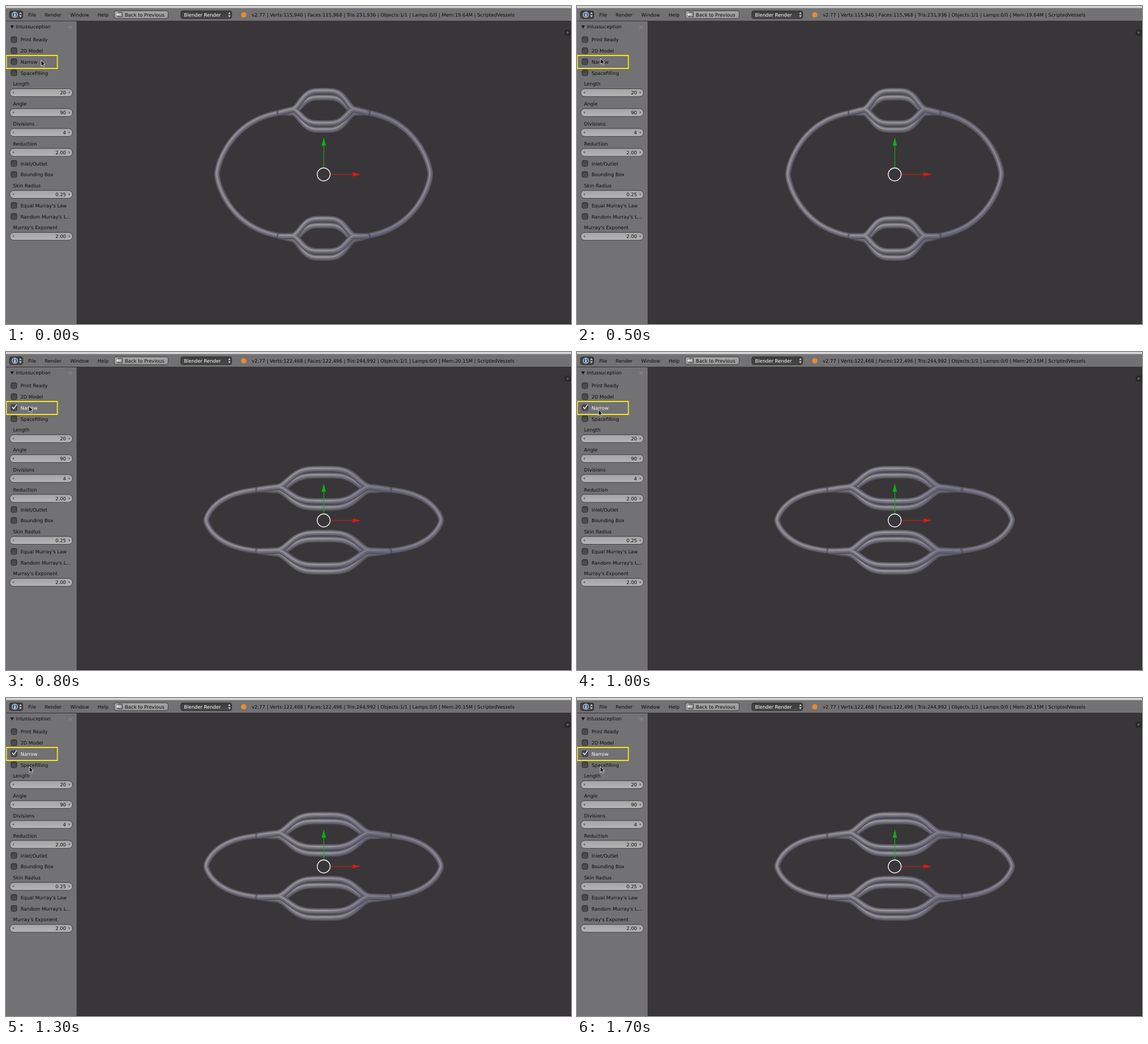
An HTML page with a canvas for the animation above (1900 ms loop, 960x540 px).

```html
<!DOCTYPE html>
<html lang="en">
<head>
<meta charset="utf-8">
<title>Narrow option</title>
<style>
html, body { margin: 0; width: 100%; height: 100%; overflow: hidden; background: #393639; }
canvas { display: block; width: 960px; height: 540px; }
</style>
</head>
<body>
<canvas id="stage" width="960" height="540"></canvas>
<script>
const LOOP = 1900, TICK = 100, CHECK_AT = 600;
const CX = 539.7, CY = 285.8;
const INK = '#0c0c0c', GREY = '#727173', DARK = '#393639';
const ctx = document.getElementById('stage').getContext('2d');
ctx.textRendering = 'geometricPrecision';
ctx.lineJoin = 'round';

// Loop half width and half height, roundness, and half width of the split part
const wide = { rx: 181.3, ry: 108.6, n: 3.3, split: 53 };
const narrow = { rx: 199.6, ry: 54.3, n: 4.8, split: 79 };

const clamp = v => Math.max(0, Math.min(1, v));
const ramp = (t, a, b) => clamp((t - a) / (b - a));

function trace(from, to, point) {
  const p = new Path2D(), steps = 80;
  for (let i = 0; i <= steps; i++) p.lineTo(...point(from + (to - from) * i / steps));
  return p;
}

// The side of the loop: a superellipse, cut off where it splits
function sideTube(m, dir) {
  const end = Math.acos((m.split / m.rx) ** (m.n / 2));
  return trace(-end, end, a => [
    CX + dir * m.rx * Math.cos(a) ** (2 / m.n),
    CY + m.ry * Math.sign(a) * Math.abs(Math.sin(a)) ** (4 / 3)
  ]);
}

// One of four strands between the two ends of a split
function strand(m, half, bend, depth) {
  const reach = m.split * 1.4;
  return trace(-reach, reach, x => {
    const u = Math.abs(x) / m.split;
    const rise = 0.5 + 0.5 * Math.cos(Math.PI * Math.min(1, u) ** 2);
    const spread = (3 + 2.5 * rise) * (1 - ramp(u, 0.95, 1.4));
    const side = m.ry * (1 - Math.abs(x / m.rx) ** m.n) ** (2 / 3);
    return [CX + x, CY + half * side + bend * 27.5 * rise + depth * spread];
  });
}

function sheen(m, ...colors) {
  const g = ctx.createLinearGradient(CX - m.rx, 0, CX + m.rx, 0);
  colors.forEach((c, i) => g.addColorStop(i / (colors.length - 1), c));
  return g;
}

function tubes(m, width, ...paths) {
  const layers = [
    [1, 0, '#4a4956'],
    [0.84, -0.2, '#5d5c69'],
    [0.58, -0.6, sheen(m, '#75747b', '#727179', '#74737b', '#656472', '#6d6c77')],
    [0.24, -1.1, sheen(m, '#929196', '#8e8d93', '#96959a', '#777684', '#8c8b92')]
  ];
  for (const [k, off, color] of layers) {
    ctx.save();
    ctx.translate(off * 0.6, off);
    ctx.lineWidth = width * k;
    ctx.strokeStyle = color;
    paths.forEach(p => ctx.stroke(p));
    ctx.restore();
  }
}

function drawModel(m) {
  ctx.lineCap = 'round';
  tubes(m, 10, sideTube(m, -1), sideTube(m, 1));
  for (const half of [-1, 1])
    for (const depth of [1, -1])
      tubes(m, 10.6, strand(m, half, -1, depth), strand(m, half, 1, depth));
  ctx.lineCap = 'butt';
}

function text(s, x, y, color = INK, align = 'left') {
  ctx.font = '8.07px "DejaVu Sans", sans-serif';
  ctx.textAlign = align;
  ctx.fillStyle = color;
  ctx.fillText(s, x, y + 3);
}

function rect(color, x, y, w, h) {
  ctx.fillStyle = color;
  ctx.fillRect(x, y, w, h);
}

function poly(color, ...pts) {
  ctx.fillStyle = color;
  ctx.beginPath();
  pts.forEach(p => ctx.lineTo(...p));
  ctx.fill();
}

// Triangle with its tip at x, y, pointing along the unit vector dx, dy
function arrow(color, x, y, dx, dy, long, half) {
  const bx = x - dx * long, by = y - dy * long;
  poly(color, [x, y], [bx - dy * half, by + dx * half], [bx + dy * half, by - dx * half]);
}

function line(color, width, ...pts) {
  ctx.strokeStyle = color;
  ctx.lineWidth = width;
  ctx.beginPath();
  pts.forEach(p => ctx.lineTo(...p));
  ctx.stroke();
}

function disc(color, x, y, r) {
  ctx.fillStyle = color;
  ctx.beginPath();
  ctx.arc(x, y, r, 0, 7);
  ctx.fill();
}

function box(x, y, w, h, r, top, bottom, edge) {
  const g = ctx.createLinearGradient(0, y, 0, y + h);
  g.addColorStop(0, top);
  g.addColorStop(1, bottom);
  ctx.fillStyle = g;
  ctx.strokeStyle = edge;
  ctx.lineWidth = 0.8;
  ctx.beginPath();
  ctx.roundRect(x, y, w, h, r);
  ctx.fill();
  ctx.stroke();
}

function menuBox(x, w) {
  box(x, 8.2, w, 13.2, 3.5, '#3b3b3b', '#494949', '#242424');
  arrow('#d5d5d5', x + w - 4, 10.2, 0, -1, 3.4, 2);
  arrow('#d5d5d5', x + w - 4, 19.2, 0, 1, 3.4, 2);
}

function drawHeader(on) {
  rect(GREY, 0, 0, 960, 25);
  rect('#d5d6d4', 0, 0, 960, 3.5);

  menuBox(6, 22.5);
  disc('#dce6f2', 15, 14.8, 5);
  disc('#3e6593', 15, 14.8, 4);
  rect('#fff', 14.3, 11.8, 1.6, 1.5);
  rect('#fff', 14.3, 14, 1.6, 3.8);

  text('File', 37.7, 15);
  text('Render', 65.7, 15);
  text('Window', 109.2, 15);
  text('Help', 155.7, 15);

  box(184, 8.2, 91.5, 13.2, 3.5, '#a5a5a5', '#969696', '#303030');
  line('#303030', 0.9, [190, 10.5], [197.5, 10.5], [197.5, 18.5], [190, 18.5], [190, 16.5]);
  line('#f0f0f0', 1.2, [188, 14.5], [195, 14.5]);
  arrow('#f0f0f0', 187, 14.5, -1, 0, 3.5, 2.5);
  text('Back to Previous', 202, 15);

  menuBox(297, 86.5);
  text('Blender Render', 302.5, 15, '#fff');

  disc('#e9892d', 404, 15, 4.6);
  const [verts, faces, tris, mem] = on
    ? ['122,468', '122,496', '244,992', '20.15M']
    : ['115,940', '115,968', '231,936', '19.64M'];
  text(`v2.77 | Verts:${verts} | Faces:${faces} | Tris:${tris} | Objects:1/1 | Lamps:0/0 | Mem:${mem} | ScriptedVessels`, 417.6, 15);
}

function checkbox(label, y, on) {
  box(8.5, y - 5.2, 10, 10, 2.5, '#444345', '#504f51', '#29282a');
  if (on) line('#f4f4f4', 1.4, [10.5, y - 1.5], [13, y + 1.5], [18, y - 5.5]);
  text(label, 24.7, y, on ? '#fff' : INK);
}

function field(label, value, y) {
  const c = y + 14.8;
  text(label, 12, y);
  box(6.5, c - 6.6, 106.5, 13.3, 6.6, '#a4a4a4', '#b4b4b4', '#343335');
  arrow('#555', 11, c, -1, 0, 2.4, 2);
  arrow('#555', 109, c, 1, 0, 2.4, 2);
  text(value, 102, c + 0.3, INK, 'right');
}

// Labels in order; those with a value are number fields
const rows = [
  ['Print Ready'], ['2D Model'], ['Narrow'], ['Spacefilling'],
  ['Length', '20'], ['Angle', '90'], ['Divisions', '4'], ['Reduction', '2.00'],
  ['Inlet/Outlet'], ['Bounding Box'], ['Skin Radius', '0.25'],
  ["Equal Murray's Law"], ["Random Murray's L..."], ["Murray's Exponent", '2.00']
];

function drawPanel(on) {
  rect(GREY, 0, 26, 120, 514);
  arrow('#151515', 10.3, 38.3, 0, 1, 5.3, 3);
  text('Intussuception', 16.7, 35.2);
  rect('#929193', 106, 34.3, 6.5, 0.9);
  rect('#929193', 106, 36.5, 6.5, 0.9);

  let y = 57.3;
  for (const [label, value] of rows) {
    if (value) field(label, value, y);
    else checkbox(label, y, on && label === 'Narrow');
    y += value ? 33.8 : 18.75;
  }
  ctx.strokeStyle = '#f1e51f';
  ctx.lineWidth = 1.8;
  ctx.strokeRect(0.6, 84, 86.7, 22);
}

function drawGizmo() {
  line('#08b40c', 1.2, [540, 275], [540, 237]);
  arrow('#08b40c', 540, 223, 0, -1, 14.3, 3.6);
  line('#dc1a0e', 1.2, [551, 286], [590, 286]);
  arrow('#dc1a0e', 603, 286, 1, 0, 14, 3.6);
  ctx.strokeStyle = '#f2f2f2';
  ctx.lineWidth = 1.3;
  ctx.beginPath();
  ctx.arc(539.8, 286, 11, 0, 7);
  ctx.stroke();
}

function drawCursor(t) {
  const left = ramp(t, 0, 300), down = ramp(t, 700, 1000), leave = ramp(t, 1000, 1300);
  ctx.save();
  ctx.translate(59.5 - 19.5 * left - 3.5 * down + 3 * leave, 92 - 3 * left + 9 * down + 18.5 * leave);
  const shape = [[0, 0], [0, 9.8], [2.3, 7.8], [3.9, 11.4], [5.6, 10.6], [4, 7.2], [7, 7]];
  poly('#0a0a0a', ...shape);
  line('#f5f5f5', 0.8, ...shape, shape[0]);
  ctx.restore();
}

function draw(t) {
  const on = t >= CHECK_AT;
  rect(DARK, 0, 0, 960, 540);
  drawModel(on ? narrow : wide);
  drawGizmo();
  drawHeader(on);
  drawPanel(on);
  box(949.5, 40.5, 12, 9.5, 3, '#2a282a', '#2a282a', '#2a282a');
  line('#777', 1, [952, 45.2], [956.6, 45.2]);
  line('#777', 1, [954.3, 43], [954.3, 47.5]);
  rect('#2c2a2c', 959, 25, 1, 515);
  rect('#2c2a2c', 120, 539, 840, 1);
  drawCursor(t);
}

const start = performance.now();
function frame() {
  const t = (performance.now() - start) % LOOP;
  draw(Math.floor(t / TICK) * TICK);
  requestAnimationFrame(frame);
}
frame();
</script>
</body>
</html>
```
